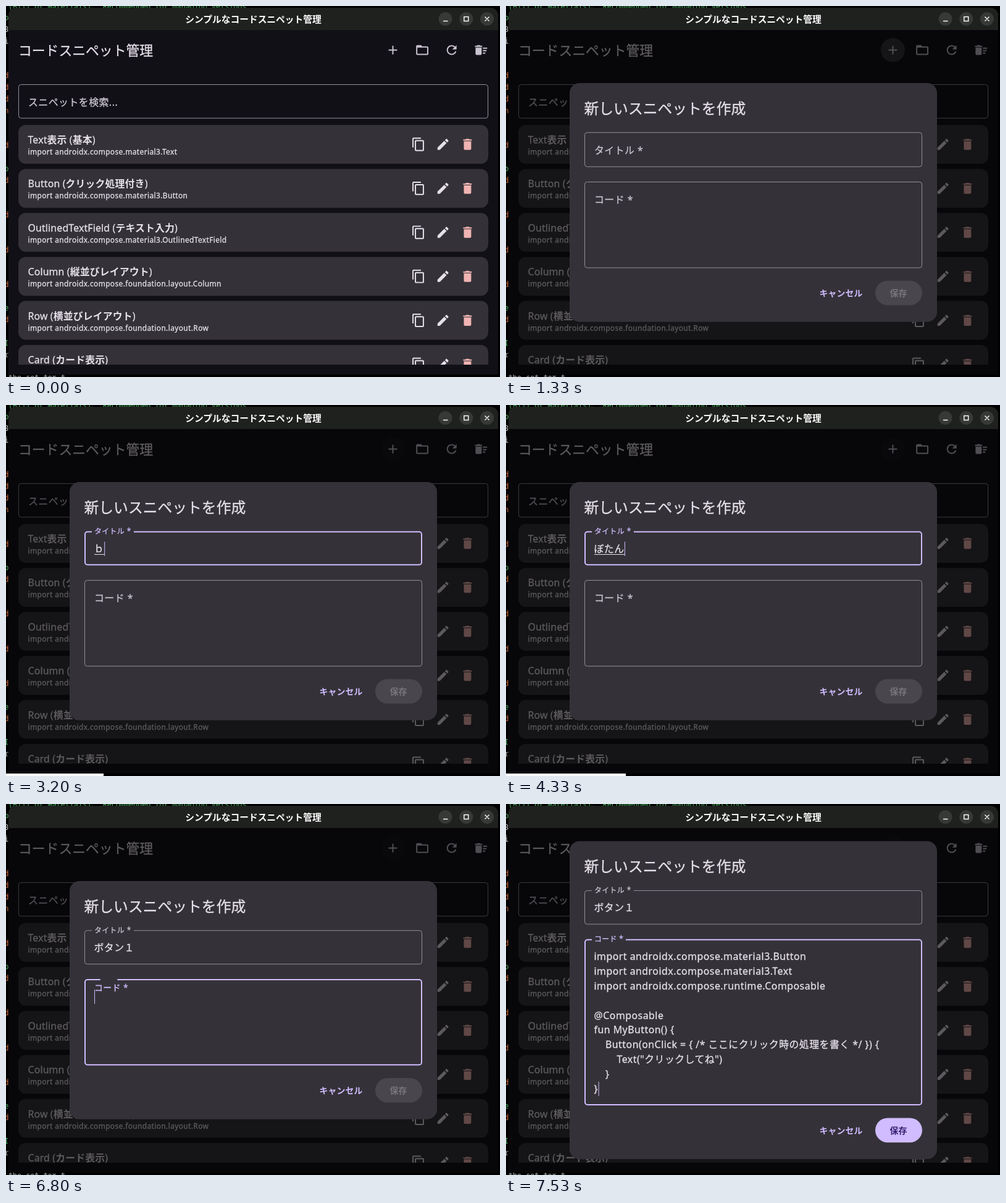
Recreate the animation shown at these times as an HTML page. Size 800 by 602 pixels, loop 8000 ms.

```html
<!DOCTYPE html>
<html lang="ja">
<head>
<meta charset="utf-8">
<title>コードスニペット管理</title>
<style>
html, body { margin: 0; width: 100%; height: 100%; overflow: hidden; background: #000; }
svg { display: block; }
text { white-space: pre; font-family: 'Noto Sans', 'Noto Sans CJK JP', sans-serif; stroke-width: .3; }
.mono { font-family: 'Noto Sans Mono', 'DejaVu Sans Mono', monospace; }
.medium { font-weight: 500; }
.medium tspan { font-weight: 700; stroke-width: 0; }
</style>
</head>
<body>
<svg id="stage" width="800" height="602" viewBox="0 0 800 602">
  <g id="desk"></g>
  <g id="app"></g>
  <rect id="hover" x="607" y="52" width="39" height="39" rx="19.5" fill="#cac4d0"/>
  <rect id="scrim" x="4" y="39" width="793" height="559"/>
  <g id="dialog"></g>
  <rect id="ime" y="598" height="4" fill="#fff"/>
</svg>
<script>
const FPS = 15, FRAMES = 120, DP = 0.992;
const INK = '#e6e0e9', SOFT = '#cac4d0', LINE = '#938f99', ACCENT = '#d0bcff', CARD = '#343238';
const $ = id => document.getElementById(id);
const clamp = v => Math.max(0, Math.min(1, v));
const ease = v => v * v * (3 - 2 * v);
const mix = (a, b, p) => a + (b - a) * p;

const icons = {
  add: 'M19 13h-6v6h-2v-6H5v-2h6V5h2v6h6v2z',
  folder: 'M20 6h-8l-2-2H4c-1.1 0-2 .9-2 2v12c0 1.1.9 2 2 2h16c1.1 0 2-.9 2-2V8c0-1.1-.9-2-2-2zm0 12H4V8h16v10z',
  refresh: 'M17.65 6.35C16.2 4.9 14.21 4 12 4c-4.42 0-8 3.58-8 8s3.58 8 8 8c3.73 0 6.84-2.55 7.73-6h-2.08c-.82 2.33-3.04 4-5.65 4-3.31 0-6-2.69-6-6s2.69-6 6-6c1.66 0 3.14.69 4.22 1.78L13 11h7V4l-2.35 2.35z',
  sweep: 'M15 16h4v2h-4zm0-8h7v2h-7zm0 4h6v2h-6zM3 18c0 1.1.9 2 2 2h6c1.1 0 2-.9 2-2V8H3v10zM14 5h-3l-1-1H6L5 5H2v2h12z',
  copy: 'M16 1H4c-1.1 0-2 .9-2 2v14h2V3h12V1zm3 4H8c-1.1 0-2 .9-2 2v14c0 1.1.9 2 2 2h11c1.1 0 2-.9 2-2V7c0-1.1-.9-2-2-2zm0 16H8V7h11v14z',
  edit: 'M3 17.25V21h3.75L17.81 9.94l-3.75-3.75L3 17.25zM20.71 7.04c.39-.39.39-1.02 0-1.41l-2.34-2.34c-.39-.39-1.02-.39-1.41 0l-1.83 1.83 3.75 3.75 1.83-1.83z',
  trash: 'M6 19c0 1.1.9 2 2 2h8c1.1 0 2-.9 2-2V7H6v12zM19 4h-3.5l-1-1h-5l-1 1H5v2h14V4z'
};

const text = (x, y, s, dp, fill = INK, spacing = 0, extra = '') =>
  `<text x="${x}" y="${y}" font-size="${dp * DP}" fill="${fill}" stroke="${fill}" letter-spacing="${spacing}" ${extra}>${s}</text>`;
// Medium Latin with bold Japanese, as the font fallback gives it.
const medium = (x, y, s, dp, fill, spacing, extra = '') =>
  text(x, y, s.replace(/[^\x00-\x7f]+/g, '<tspan>$&</tspan>'), dp, fill, spacing, 'class="medium" ' + extra);
const rect = (x, y, w, h, r, fill) =>
  `<rect x="${x}" y="${y}" width="${w}" height="${h}" rx="${r}" fill="${fill}"/>`;
const icon = (name, cx, cy, fill = SOFT) =>
  `<path d="${icons[name]}" fill="${fill}" transform="translate(${cx} ${cy}) scale(${DP}) translate(-12 -12)"/>`;

// Rounded outline with an optional gap in its top edge.
function outline(x, y, w, h, focused, from = 8, to = 8) {
  const s = focused ? 2 : 1, i = s / 2, v = h - 8 - s;
  return `<path fill="none" stroke="${focused ? ACCENT : LINE}" stroke-width="${s}" d="M${x + to} ${y + i}
    H${x + w - 4 - i}a4 4 0 0 1 4 4v${v}a4 4 0 0 1-4 4H${x + 4 + i}a4 4 0 0 1-4-4v${-v}a4 4 0 0 1 4-4H${x + from}"/>`;
}

function drawDesk() {
  const colors = { d: '#d8703c', n: '#d8703c', r: '#999', o: '#4fb865', e: '#4fb865', I: '#4fb865' };
  const edge = ' o3i  dddn  d od  d  d  d ed Ir';
  const mono = (x, y, s, fill, extra = '') =>
    `<text class="mono" x="${x}" y="${y}" font-size="11.75" fill="${fill}" ${extra}>${s}</text>`;
  $('desk').innerHTML = mono(4, 4.5, '(Bill of Materials)、 Recommended for managing versions', '#4fb865') +
    [...edge].map((c, k) => mono(4.2, 4 + 18.85 * k, c, colors[c] || '#ccc', 'text-anchor="end"')).join('') +
    mono(4, 607, 'the set for f', '#aaa');
}

function drawApp() {
  const cards = [
    ['Text表示 (基本)', 'material3.Text'],
    ['Button (クリック処理付き)', 'material3.Button'],
    ['OutlinedTextField (テキスト入力)', 'material3.OutlinedTextField'],
    ['Column (縦並びレイアウト)', 'foundation.layout.Column'],
    ['Row (横並びレイアウト)', 'foundation.layout.Row'],
    ['Card (カード表示)', 'material3.Card']
  ];
  const card = ([title, name], i) => {
    const y = 193 + 71.4 * i;
    return rect(20, y, 761, 63, 12, CARD) +
      medium(35.5, y + 30, title, 16, INK, 0.15) +
      text(35.5, y + 48, 'import androidx.compose.' + name, 12, INK, 0.4) +
      icon('copy', 668, y + 31.5, INK) + icon('edit', 707.7, y + 31.5, INK) + icon('trash', 747.4, y + 31.5, '#f0b4b2');
  };
  $('app').innerHTML = `
    <path d="M4 598V15a12 12 0 0 1 12-12H785a12 12 0 0 1 12 12V598z" fill="#121017"/>
    <path d="M4 39V15a12 12 0 0 1 12-12H785a12 12 0 0 1 12 12V39z" fill="#1f211f"/>` +
    text(400.5, 26.5, 'シンプルなコードスニペット管理', 14.85, '#fff', 0, 'style="font-weight:700;stroke-width:0" text-anchor="middle"') +
    [711.5, 745.3, 779].map(x => `<circle cx="${x}" cy="21" r="11" fill="#373937"/>`).join('') +
    `<path d="M708 24.5h7.5M741.8 17.5h7v7h-7zM775.5 17.5l7 7m0-7l-7 7" fill="none" stroke="#fff" stroke-width="1.4"/>` +
    text(20, 80, 'コードスニペット管理', 22) +
    ['add', 'folder', 'refresh', 'sweep'].map((n, i) => icon(n, 626.5 + 47.6 * i, 71.5)).join('') +
    outline(20, 127, 761, 55.5) + text(36, 162, 'スニペットを検索...', 16, SOFT, 0.5) +
    `<clipPath id="list"><path d="M0 183H800V582H0z"/></clipPath><g clip-path="url(#list)">${cards.map(card).join('')}</g>`;
}

const code = `import androidx.compose.material3.Button
import androidx.compose.material3.Text
import androidx.compose.runtime.Composable

@Composable
fun MyButton() {
    Button(onClick = { /* ここにクリック時の処理を書く */ }) {
        Text("クリックしてね")
    }
}`.split('\n');

// Frame, title text, start of the underlined part.
const typing = [
  [35, '', 0], [48, 'ｂ', 0], [53, 'ぼ', 0], [58, 'ぼｔ', 0], [60, 'ぼた', 0], [63, 'ぼたｎ', 0],
  [65, 'ぼたん', 0], [70, 'ボタン', 0], [76, 'ボタン１', 3], [99, 'ボタン１', 4]
];
const TITLE_FOCUS = 35, CONVERT = 70, CODE_FOCUS = 101, PASTE = 113, CHAR = 15.87 + 0.5;
const LINE_H = 24 * DP, EMPTY_H = 140.3, FULL_H = (code.length * 24 + 32) * DP;

function field(y, h, label, gap, p, focused) {
  const half = gap / 2 * p, mid = 12 + gap / 2;
  return outline(127, y, 547, h, focused, p ? mid - half : 8, p ? mid + half : 8) +
    text(143, y + mix(35, 3.7, p), label, mix(16, 12, p), focused ? ACCENT : SOFT, mix(0.5, 0.4, p));
}

function drawDialog(f) {
  const pasted = f >= PASTE, titleFocus = f >= TITLE_FOCUS && f < CODE_FOCUS, codeFocus = f >= CODE_FOCUS;
  const h2 = pasted ? FULL_H : EMPTY_H, drop = f < TITLE_FOCUS ? 1 : 0;
  const top = 125 - (h2 - EMPTY_H) / 2;
  const y1 = top + 79.8, y2 = top + 159 + drop, by = y2 + h2 + 40.2;
  const entry = typing.filter(e => e[0] <= f).pop();
  const [start, title, mark] = entry || [0, '', 0];
  const lift = from => ease(clamp((f - from + 1) / 4));

  let s = rect(103, top, 595, by + 47 - top, 16, CARD) +
    text(126.5, top + 49.5, '新しいスニペットを作成', 24) +
    field(y1, 55.5 + drop, 'タイトル *', 68, lift(TITLE_FOCUS), titleFocus) +
    field(y2, h2, 'コード *', 55, lift(CODE_FOCUS), codeFocus) +
    text(142.5, y1 + 34.1, title, 16, INK, 0.5);
  if (titleFocus && mark < title.length)
    s += rect(143 + mark * CHAR, y1 + 37.2, (title.length - mark) * CHAR, 1, 0, INK);
  if (pasted)
    s += code.map((l, i) => text(142.5, y2 + 34.2 + LINE_H * i, l, 16, INK, 0.5)).join('');

  const reset = pasted ? PASTE : codeFocus ? CODE_FOCUS : start === 99 ? 76 : start;
  if (entry && (f - reset) % FPS < FPS / 2) {
    const x = pasted ? 149.6 : codeFocus ? 143 : 142.8 + title.length * CHAR;
    const base = codeFocus ? y2 + 34.2 + (pasted ? LINE_H * 9 : 0) : y1 + 34.1;
    s += rect(x, base - 17, 1, 23, 0, ACCENT);
  }

  s += medium(507.5, by + 5.5, 'キャンセル', 14, ACCENT, 0.1) +
    rect(598, by - 19.8, 76, 39.7, 19.8, pasted ? ACCENT : '#49474d') +
    medium(635.5, by + 5.5, '保存', 14, pasted ? '#381e72' : '#78757c', 0.1, 'text-anchor="middle"');
  $('dialog').innerHTML = s;

  const typed = f >= 48 && f < CONVERT;
  $('ime').setAttribute('width', typed ? 140 + 18 * title.length : 0);
}

function draw(f) {
  const shown = clamp((f - 17) / 3);
  $('hover').setAttribute('opacity', f < 15 ? 0 : f < 18 ? 0.08 : 0.17 * clamp((24 - f) / 4) + 0.02);
  $('scrim').setAttribute('opacity', 0.6 * shown);
  $('dialog').setAttribute('opacity', shown);
  drawDialog(f);
}

let last = -1;
function tick(now) {
  const f = Math.min(FRAMES - 1, Math.floor((now % 8000 + 4) * FPS / 1000));
  if (f !== last) draw(last = f);
  requestAnimationFrame(tick);
}
drawDesk();
drawApp();
draw(0);
requestAnimationFrame(tick);
</script>
</body>
</html>
```
